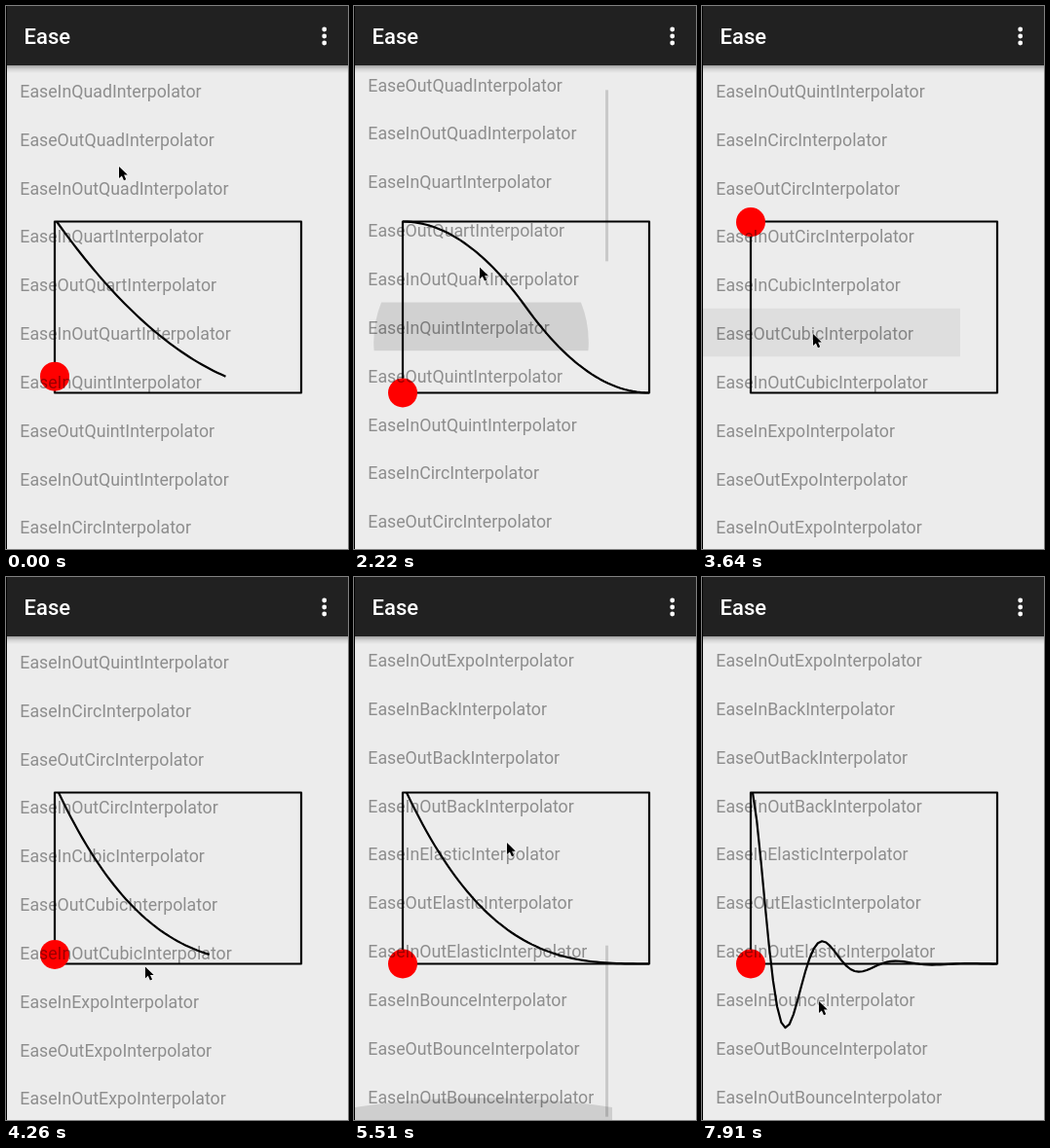
Recreate the animation shown at these times as an HTML page with a canvas. Size 351 by 558 pixels, loop 8000 ms.

```html
<!DOCTYPE html>
<html lang="en">
<head>
<meta charset="utf-8">
<title>Ease</title>
<style>
  html, body { margin: 0; width: 100%; height: 100%; overflow: hidden; background: #ececec; }
  canvas { display: block; }
</style>
</head>
<body>
<canvas id="stage" width="351" height="558"></canvas>
<script>
const ctx = document.getElementById('stage').getContext('2d');
const LOOP = 8000, ROW = 49.85, BAR = 61, LIST_LEFT = 1, LIST_WIDTH = 264;
const GRAPH = { x: 50, y: 221.5, w: 253, h: 176 };
const families = ['Quad', 'Quart', 'Quint', 'Circ', 'Cubic', 'Expo', 'Back', 'Elastic', 'Bounce'];
const labels = families.flatMap(f => ['In', 'Out', 'InOut'].map(d => `Ease${d}${f}Interpolator`));

const outQuad = p => 1 - (1 - p) ** 2;
const inOutQuad = p => p < 0.5 ? 2 * p * p : 1 - 2 * (1 - p) ** 2;
const outCubic = p => 1 - (1 - p) ** 3;
const outElastic = p => p >= 1 ? 1 : 1 - 2 ** (-10 * p) * Math.cos(p * 2 * Math.PI / 0.3);

// Each run plots one curve for a second, beginning a little right of the box edge
const runs = [
  { start: -690, inset: 2, ease: outQuad },
  { start: 980, inset: 0, ease: inOutQuad },
  { start: 3640, inset: 4, ease: outCubic },
  { start: 6890, inset: 2, ease: outElastic }
];
const taps = [{ time: 970, row: 2 }, { time: 3630, row: 13 }, { time: 6840, row: 22 }];

// [time, x, y]
const cursorPath = [
  [90, 116, 165], [600, 117, 184], [1450, 117, 184], [1950, 130, 392], [2100, 130, 392],
  [2220, 129, 269], [2310, 128, 215], [2400, 127, 240], [2570, 125, 318], [3200, 114, 337],
  [3900, 114, 337], [4350, 150, 416], [4920, 161, 416], [5060, 161, 255], [5150, 160, 215],
  [5330, 158, 266], [5510, 157, 273], [6000, 152, 300], [6300, 152, 300], [6700, 117, 338],
  [6880, 117, 338], [7110, 118, 390], [7500, 120, 436]
];
// [time, vertical scale]
const glowPath = [[5290, 0], [5440, 0.46], [5510, 0.43], [5990, 0]];

const clamp = v => Math.max(0, Math.min(1, v));
const ramp = (t, from, to) => clamp((t - from) / (to - from));

function along(path, t) {
  const next = path.findIndex(key => key[0] > t);
  if (next === 0) return path[0].slice(1);
  if (next < 0) return path[path.length - 1].slice(1);
  const a = path[next - 1], b = path[next], p = ramp(t, a[0], b[0]);
  return a.slice(1).map((v, i) => v + (b[i + 1] - v) * p);
}

// Two drags, each followed by a fling; the second one hits the end of the list
function scrollAt(t) {
  const rest = 398.8, end = 849.3;
  if (t < 2220) return 54 * ramp(t, 2130, 2220);
  if (t < 4990) return t > 3290 ? rest : rest - 344.8 * Math.exp((2220 - t) / 171);
  if (t < 5060) return rest + 11.8 * ramp(t, 4990, 5060);
  return end - 438.7 * (1 - ramp(t, 5060, 5325)) ** 1.3;
}

const shade = alpha => `rgba(0,0,0,${alpha})`;
const rowTop = (row, scroll) => 61.3 + row * ROW - scroll;

function disc(x, y, r, color) {
  ctx.fillStyle = color;
  ctx.beginPath();
  ctx.arc(x, y, r, 0, 2 * Math.PI);
  ctx.fill();
}

function clipped(x, y, w, h, draw) {
  ctx.save();
  ctx.beginPath();
  ctx.rect(x, y, w, h);
  ctx.clip();
  draw();
  ctx.restore();
}

function drawGraph(t) {
  const { x, y, w, h } = GRAPH;
  const { start, inset, ease } = runs.filter(r => r.start <= t).pop();
  const end = clamp((t - start) / 1000);
  const yAt = p => y + h * ease(p);
  ctx.strokeStyle = '#000';
  ctx.lineWidth = 2.2;
  ctx.lineJoin = 'round';
  ctx.strokeRect(x, y, w, h);
  ctx.beginPath();
  ctx.moveTo(x + inset, y);
  const steps = Math.ceil(end * 60);
  for (let i = 1; i <= steps; i++) {
    const p = end * i / steps;
    ctx.lineTo(x + inset + (w - inset) * p, yAt(p));
  }
  ctx.stroke();
  disc(x, yAt(end), 15, '#f00');
}

function drawTaps(t, scroll) {
  for (const { time, row } of taps) {
    const age = t - time;
    if (age < 0 || age > 560) continue;
    const top = rowTop(row, scroll), alpha = 0.06 * (1 - ramp(age, 260, 560));
    clipped(LIST_LEFT, top, LIST_WIDTH, ROW, () => {
      ctx.fillStyle = shade(alpha);
      ctx.fillRect(LIST_LEFT, top, LIST_WIDTH, ROW);
      if (age > 40) disc(118, top + 27, (age - 40) * 0.6, shade(alpha));
    });
  }
  if (t > 2050 && t < 2450) {
    const top = rowTop(6, scroll), alpha = 0.114 * (1 - ramp(t, 2230, 2450));
    clipped(LIST_LEFT, top, LIST_WIDTH, ROW, () =>
      disc(130.5, top + 41, (t - 2050) * 0.645, shade(alpha)));
  }
}

function drawList(t) {
  const scroll = scrollAt(t);
  drawTaps(t, scroll);
  ctx.font = '17.75px Roboto, sans-serif';
  ctx.fillStyle = shade(0.4);
  labels.forEach((label, i) => {
    const y = 93.8 + i * ROW - scroll;
    if (y > 40 && y < 580) ctx.fillText(label, 14.3, y);
  });

  const bar = t > 2130 && t < 3440 ? 1 : t > 4990 ? 1 - ramp(t, 5650, 5930) : 0;
  ctx.fillStyle = shade(0.15 * bar);
  ctx.fillRect(258, 65.7 + scroll * 0.3685, 3, 176);

  const [k] = along(glowPath, t);
  if (k > 0) clipped(LIST_LEFT, BAR, LIST_WIDTH, 558 - BAR, () => {
    ctx.fillStyle = shade(0.13 * clamp(k / 0.4));
    ctx.beginPath();
    ctx.ellipse(133, 558 + 343 * k, 396, 396 * k, 0, 0, 2 * Math.PI);
    ctx.fill();
  });
}

function drawBar() {
  const shadow = ctx.createLinearGradient(0, BAR, 0, BAR + 8);
  shadow.addColorStop(0, shade(0.32));
  shadow.addColorStop(0.5, shade(0.1));
  shadow.addColorStop(1, shade(0));
  ctx.fillStyle = shadow;
  ctx.fillRect(0, BAR, 351, 8);
  ctx.fillStyle = '#212121';
  ctx.fillRect(0, 0, 351, BAR);
  ctx.fillStyle = '#fff';
  ctx.font = '500 22px Roboto, sans-serif';
  ctx.fillText('Ease', 18.6, 38.7);
  for (const y of [24, 31, 38]) disc(326.7, y, 2.4, '#fff');
  ctx.fillStyle = '#000';
  ctx.fillRect(0, 0, 1, 558);
}

const arrow = new Path2D('M0 0V12L2.9 9.4L5 14.2L7.2 13.2L5.1 8.6H8.8Z');

function drawCursor(t) {
  ctx.save();
  ctx.translate(...along(cursorPath, t));
  ctx.strokeStyle = 'rgba(255,255,255,.6)';
  ctx.lineWidth = 1.4;
  ctx.stroke(arrow);
  ctx.fillStyle = '#000';
  ctx.fill(arrow);
  ctx.restore();
}

function frame(now) {
  const t = now % LOOP;
  ctx.fillStyle = '#ececec';
  ctx.fillRect(0, 0, 351, 558);
  drawGraph(t);
  drawList(t);
  drawBar();
  drawCursor(t);
  requestAnimationFrame(() => frame(performance.now() - origin));
}

const origin = performance.now();
frame(0);
</script>
</body>
</html>
```
